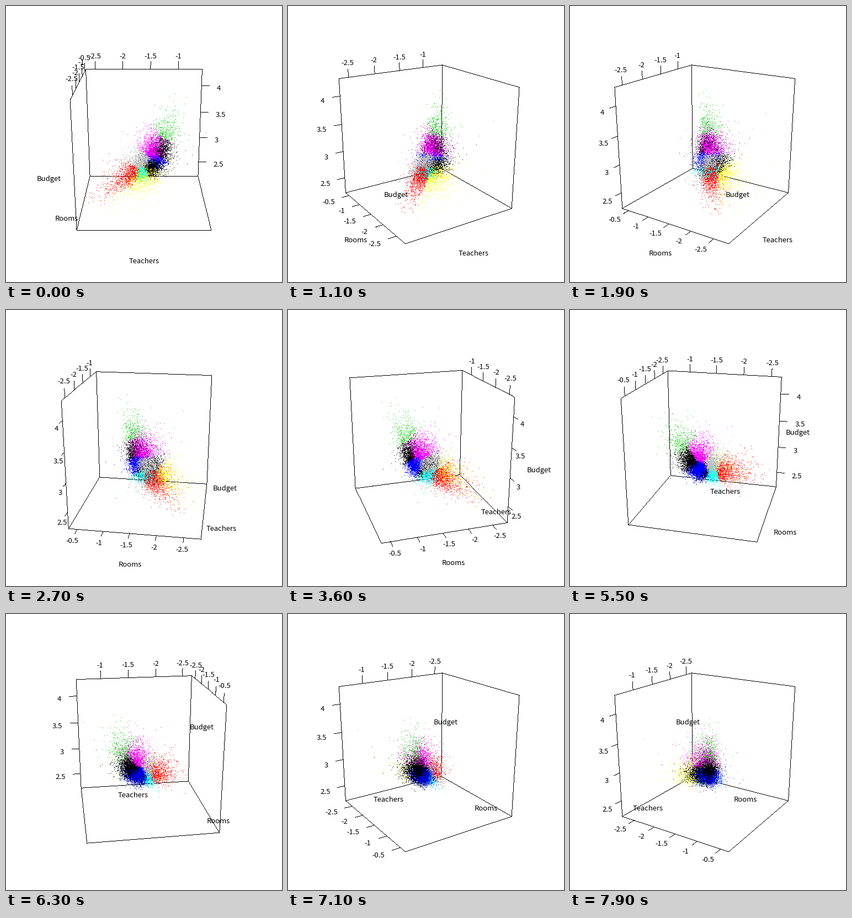
A matplotlib script for the animation above (8000 ms loop, 500 by 500 pixels).

```python
import numpy as np
import matplotlib.pyplot as plt
from matplotlib.animation import FuncAnimation
from matplotlib.colors import to_rgba_array

SIZE, FRAMES, STEP = 500, 80, 100
TURN = np.radians(3)                 # spin per frame
TILT = np.radians(20)
FOCAL = SIZE / 2 / np.tan(np.radians(15))
DIST = 8.25
TICK, GAP, MARGIN = 2 / 15, 4 / 15, 1.3
BLACK = (0, 0, 0, 255)

# tick values and their places in the unit box
X_VALS = np.arange(-2.5, -0.9, 0.5)
Y_VALS = np.arange(-2.5, -0.4, 0.5)
Z_VALS = np.arange(2.5, 4.1, 0.5)
X_POS = 0.949 * X_VALS + 1.537
Y_POS = 0.807 * Y_VALS + 1.268
Z_POS = 0.954 * Z_VALS - 3.104

TITLES = {
    "Teachers": (0, -MARGIN, -MARGIN),
    "Rooms": (-MARGIN, 0, -MARGIN),
    "Budget": (-MARGIN, -MARGIN, 0),
}

GROUPS = [
    ("#00cd00", (0.43, 0.30, 0.19)),
    ("#ff00ff", (0.10, 0.06, -0.06)),
    ("#000000", (0.29, 0.20, -0.19)),
    ("#0000ff", (0.17, 0.12, -0.345)),
    ("#bebebe", (-0.09, -0.04, -0.26)),
    ("#000000", (0.10, -0.03, -0.44)),
    ("#00ffff", (-0.035, -0.07, -0.49)),
    ("#ffff00", (-0.03, -0.34, -0.52)),
    ("#ff0000", (-0.22, -0.16, -0.455)),
]


def make_cloud(n=11500):
    """One skewed, correlated cloud, coloured by nearest group centre."""
    rng = np.random.default_rng(5)
    noise = rng.normal(size=(3, n)) * np.sqrt(5 / rng.chisquare(5, n))
    poor = rng.gamma(2, 0.11, n)
    rich = rng.exponential(0.12, n)
    drop = rng.exponential(0.12, n)
    lift = rng.gamma(2, 0.07, n)
    x = 0.24 - poor + 0.07 * noise[0]
    y = 0.25 - 0.8 * poor - drop + 0.05 * noise[1]
    z = -0.53 + 0.35 * x - 0.3 * drop + lift + 0.03 * noise[2]
    pts = np.column_stack([x + 0.45 * rich, y + 0.32 * rich, z + rich])
    pts = pts[(np.abs(pts) < 0.97).all(axis=1)]
    mids = np.array([mid for _, mid in GROUPS])
    near = ((pts[:, None] - mids) ** 2).sum(axis=2).argmin(axis=1)
    rgba = to_rgba_array([c for c, _ in GROUPS]) * 255
    return pts, rgba.astype(np.uint8)[near]


def project(pts, angle):
    """Screen x, screen y and nearness of points in the box."""
    x, y, z = np.asarray(pts, float).T
    c, s = np.cos(angle), np.sin(angle)
    right, back = x * c - y * s, x * s + y * c
    near = z * np.sin(TILT) - back * np.cos(TILT)
    up = z * np.cos(TILT) + back * np.sin(TILT)
    scale = FOCAL / (DIST - near)
    return SIZE / 2 + right * scale, SIZE / 2 - up * scale, near


def box_edges(sx, sy):
    """Edges of the floor and the two far walls."""
    edges = []
    for axis, side in ((0, sx), (1, sy), (2, -1)):
        ring = [(-1, -1), (1, -1), (1, 1), (-1, 1)]
        face = [np.insert(np.array(p, float), axis, side) for p in ring]
        edges += zip(face, face[1:] + face[:1])
    return edges


def axis_marks(sx, sy, angle):
    """Foot and outward direction of every tick, in the order of tick_texts."""
    up, out = (0, 0, 1), (-sx, 0, 0)
    marks = [((p, sy, 1), up) for p in X_POS]
    if abs(np.sin(angle)) < np.tan(TILT):
        marks += [((sx, p, 1), up) for p in Y_POS]
    else:
        marks += [((-sx, p, -1), out) for p in Y_POS]
    marks += [((-sx, sy, p), out) for p in Z_POS]
    feet, ways = zip(*marks)
    return np.array(feet, float), np.array(ways, float)


def stroke(img, a, b, angle):
    """Crisp line, one pixel wide."""
    x, y, _ = project([a, b], angle)
    n = int(max(abs(x[1] - x[0]), abs(y[1] - y[0]))) + 1
    cols, rows = np.linspace(*x, n + 1), np.linspace(*y, n + 1)
    img[rows.astype(int), cols.astype(int)] = BLACK


fig = plt.figure(figsize=(5, 5), dpi=100, facecolor="white")
ax = fig.add_axes([0, 0, 1, 1])
ax.axis("off")
pixels = ax.imshow(np.zeros((SIZE, SIZE, 4), np.uint8), aspect="auto",
                   extent=(0, SIZE, SIZE, 0), interpolation="nearest")


def label(text):
    return ax.text(0, 0, text, family="Noto Sans CJK JP", size=9.4,
                   ha="center", va="baseline")


tick_texts = [label(f"{v:g}") for v in (*X_VALS, *Y_VALS, *Z_VALS)]
title_texts = [label(t) for t in TITLES]
renderer = fig.canvas.get_renderer()
half_widths = np.array([t.get_window_extent(renderer).width / 2
                        for t in tick_texts])
cloud, colours = make_cloud()


def place(texts, xs, ys):
    for text, x, y in zip(texts, xs, ys):
        text.set_position((x - 0.3, y + 8.2))


def draw(i):
    angle = i * TURN
    sx = 1 if np.sin(angle - 1e-4) > 0 else -1
    sy = 1 if np.cos(angle - 1e-4) > 0 else -1
    feet, ways = axis_marks(sx, sy, angle)

    img = np.zeros((SIZE, SIZE, 4), np.uint8)
    for a, b in box_edges(sx, sy) + list(zip(feet, feet + TICK * ways)):
        stroke(img, a, b, angle)
    x, y, near = project(cloud, angle)
    order = np.argsort(near)
    img[y[order].astype(int), x[order].astype(int)] = colours[order]
    pixels.set_data(img)

    # tick labels go from centred to side-aligned as the tick turns sideways
    x, y, _ = project(feet + GAP * ways, angle)
    side = ways[:, 0] * np.cos(angle)
    shift = np.sign(side) * np.clip((np.abs(side) - 0.3) / 0.6, 0, 1)
    place(tick_texts, x + shift * half_widths, y)
    place(title_texts, *project(list(TITLES.values()), angle)[:2])
    return [pixels, *tick_texts, *title_texts]


anim = FuncAnimation(fig, draw, frames=FRAMES, interval=STEP, repeat=True,
                     repeat_delay=0, blit=False)
plt.show()
```
